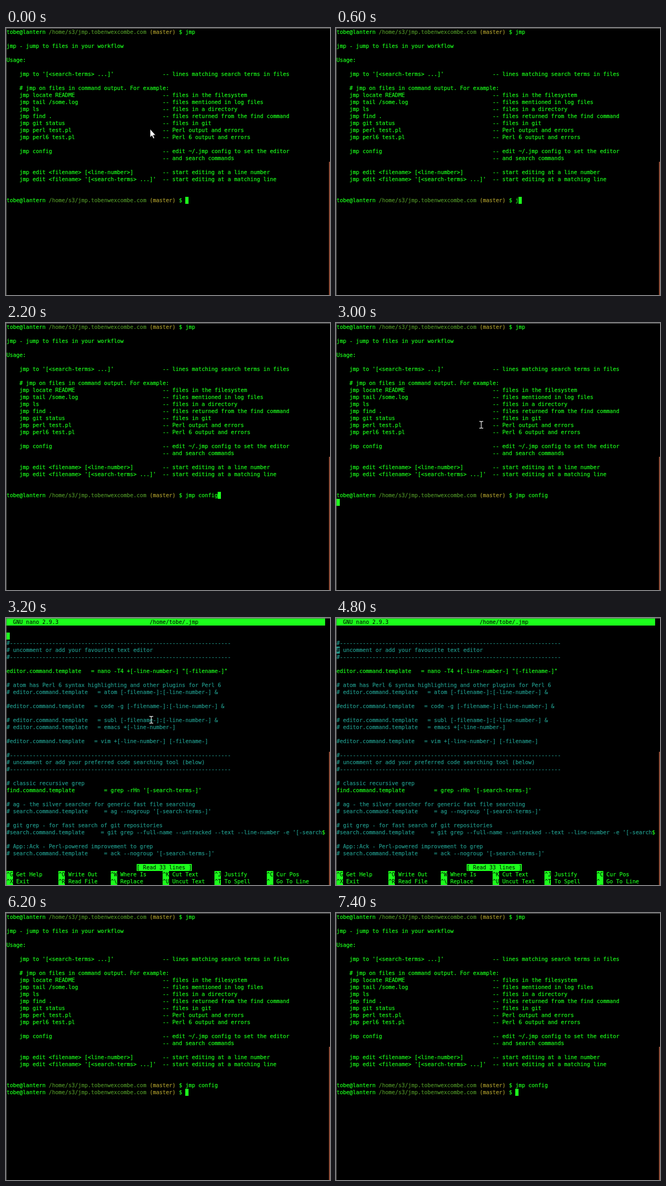
Write an HTML page that moves like this. It is 600 px wide and 495 px high and loops after 8 s.

```html
<!DOCTYPE html>
<html lang="en">
<head>
<meta charset="utf-8">
<title>jmp config</title>
<style>
  html, body { margin: 0; width: 100%; height: 100%; overflow: hidden; background: #000; }
  #stage { position: relative; width: 600px; height: 495px; overflow: hidden; background: #000; }
  pre, #cursor {
    position: absolute; margin: 0; white-space: pre; color: #1cff1c;
    font: 10px/13px "DejaVu Sans Mono", monospace; font-variant-ligatures: none;
    -webkit-text-stroke: .2px;
  }
  pre { left: 1px; top: 1px; }
  #cursor { width: 6px; height: 13px; background: #1cff1c; color: #000; }
  #cursor.dim { background: #219a8c; }
  i { font-style: normal; color: #4e9126; }
  b { font-weight: normal; color: #a99a2c; }
  s { text-decoration: none; color: #219a8c; }
  u { display: inline-block; text-decoration: none; background: #1cff1c; color: #000; -webkit-text-stroke: 0; }
  svg { position: absolute; left: 0; top: 0; }
  #edge { position: absolute; inset: 0; border: solid #666; border-width: 1px 0 0 1px; }
  #bar { position: absolute; left: 598px; top: 248px; width: 2px; height: 247px; background: #8f4c36; }
</style>
</head>
<body>
<div id="stage">
<div id="edge"></div>
<pre id="shell">
<span class="prompt"></span>jmp

jmp - jump to files in your workflow

Usage:

    jmp to '[&lt;search-terms> ...]'               -- lines matching search terms in files

    # jmp on files in command output. For example:
    jmp locate README                           -- files in the filesystem
    jmp tail /some.log                          -- files mentioned in log files
    jmp ls                                      -- files in a directory
    jmp find .                                  -- files returned from the find command
    jmp git status                              -- files in git
    jmp perl test.pl                            -- Perl output and errors
    jmp perl6 test.pl                           -- Perl 6 output and errors

    jmp config                                  -- edit ~/.jmp config to set the editor
                                                -- and search commands

    jmp edit &lt;filename> [&lt;line-number>]         -- start editing at a line number
    jmp edit &lt;filename> '[&lt;search-terms> ...]'  -- start editing at a matching line


<span class="prompt"></span><span id="typed"></span>
<span class="prompt" id="again"></span></pre>
<pre id="nano">
<u id="title"></u>


<s>#--------------------------------------------------------------------
# uncomment or add your favourite text editor
#--------------------------------------------------------------------</s>

editor.command.template   = nano -T4 +[-line-number-] "[-filename-]"

<s># atom has Perl 6 syntax highlighting and other plugins for Perl 6
# editor.command.template   = atom [-filename-]:[-line-number-] &amp;

#editor.command.template   = code -g [-filename-]:[-line-number-] &amp;

# editor.command.template   = subl [-filename-]:[-line-number-] &amp;
# editor.command.template   = emacs +[-line-number-]

#editor.command.template   = vim +[-line-number-] [-filename-]

#--------------------------------------------------------------------
# uncomment or add your preferred code searching tool (below)
#--------------------------------------------------------------------

# classic recursive grep</s>
find.command.template         = grep -rHn '[-search-terms-]'

<s># ag - the silver searcher for generic fast file searching
# search.command.template     = ag --nogroup '[-search-terms-]'

# git grep - for fast search of git repositories
#search.command.template     = git grep --full-name --untracked --text --line-number -e '[-search</s>$

<s># App::Ack - Perl-powered improvement to grep
# search.command.template     = ack --nogroup '[-search-terms-]'</s>

                                        <u>[ Read 33 lines ]</u>
<span id="keys"></span></pre>
<div id="cursor"></div>
<svg width="600" height="495">
  <path id="arrow" fill="#fff" stroke="#000" stroke-width=".6" d="M267 187.500V202.500L270.300 199.500L272.800 205L275 204L272.600 198.700H277Z"/>
  <path id="beam" fill="none" stroke="#ddd" stroke-width="1.300" d="M265.500 182.500H268L269 183.500L270 182.500H272.500M269 183.500V194M265.500 195H268L269 194L270 195H272.500"/>
</svg>
<div id="bar"></div>
</div>
<script>
const $ = id => document.getElementById(id);
const CELL = 6.02, ROW = 13, PROMPT = 55, COMMAND = "jmp config";

for (const el of document.querySelectorAll(".prompt"))
  el.innerHTML = "tobe@lantern <i>/home/s3/jmp.tobenwexcombe.com</i> <b>(master)</b> $ ";

$("title").textContent = "  GNU nano 2.9.3".padEnd(44) + "/home/tobe/.jmp".padEnd(54);

const keyRow = keys => keys.split(",").map(k =>
  `<u>${k.slice(0, 2)}</u>${k.slice(2).padEnd(14)}`).join("");
$("keys").innerHTML =
  keyRow("^G Get Help,^O Write Out,^W Where Is,^K Cut Text,^J Justify,^C Cur Pos") + "\n" +
  keyRow("^X Exit,^R Read File,^\\ Replace,^U Uncut Text,^T To Spell,^_ Go To Line");

// value of the last [time, value] step already reached
const at = (t, steps) => steps.findLast(s => s[0] <= t)[1];
const show = (id, on) => $(id).style.visibility = on ? "visible" : "hidden";

function draw(t) {
  const editing = t >= 3200 && t < 5000, done = t >= 5000;
  const typed = at(t, [[0, 0], [600, 1], [800, 2], [1000, 4], [1400, 7], [1600, 8], [1800, 10]]);
  const row = at(t, [[0, 24], [3000, 25], [3200, 2], [3400, 4], [5000, 25]]);
  const col = editing || row === 25 && !done ? 0 : PROMPT + (done ? 0 : typed);
  const lit = at(t, [[0, 1], [2400, 0], [3000, 1], [4000, 0], [4600, 1],
    [5600, 0], [6200, 1], [7000, 0], [7400, 1]]);
  const onHash = row === 4;

  show("shell", !editing);
  show("nano", editing);
  show("again", done);
  show("arrow", t < 600);
  show("beam", t >= 2400 && t < 3400);
  show("cursor", lit);
  $("typed").textContent = COMMAND.slice(0, typed);
  const c = $("cursor");
  c.className = onHash ? "dim" : "";
  c.textContent = onHash ? "#" : "";
  c.style.left = 1 + col * CELL + "px";
  c.style.top = 1 + row * ROW + "px";
}

const start = performance.now();
function tick() {
  draw((performance.now() - start) % 8000);
  requestAnimationFrame(tick);
}
tick();
</script>
</body>
</html>
```
